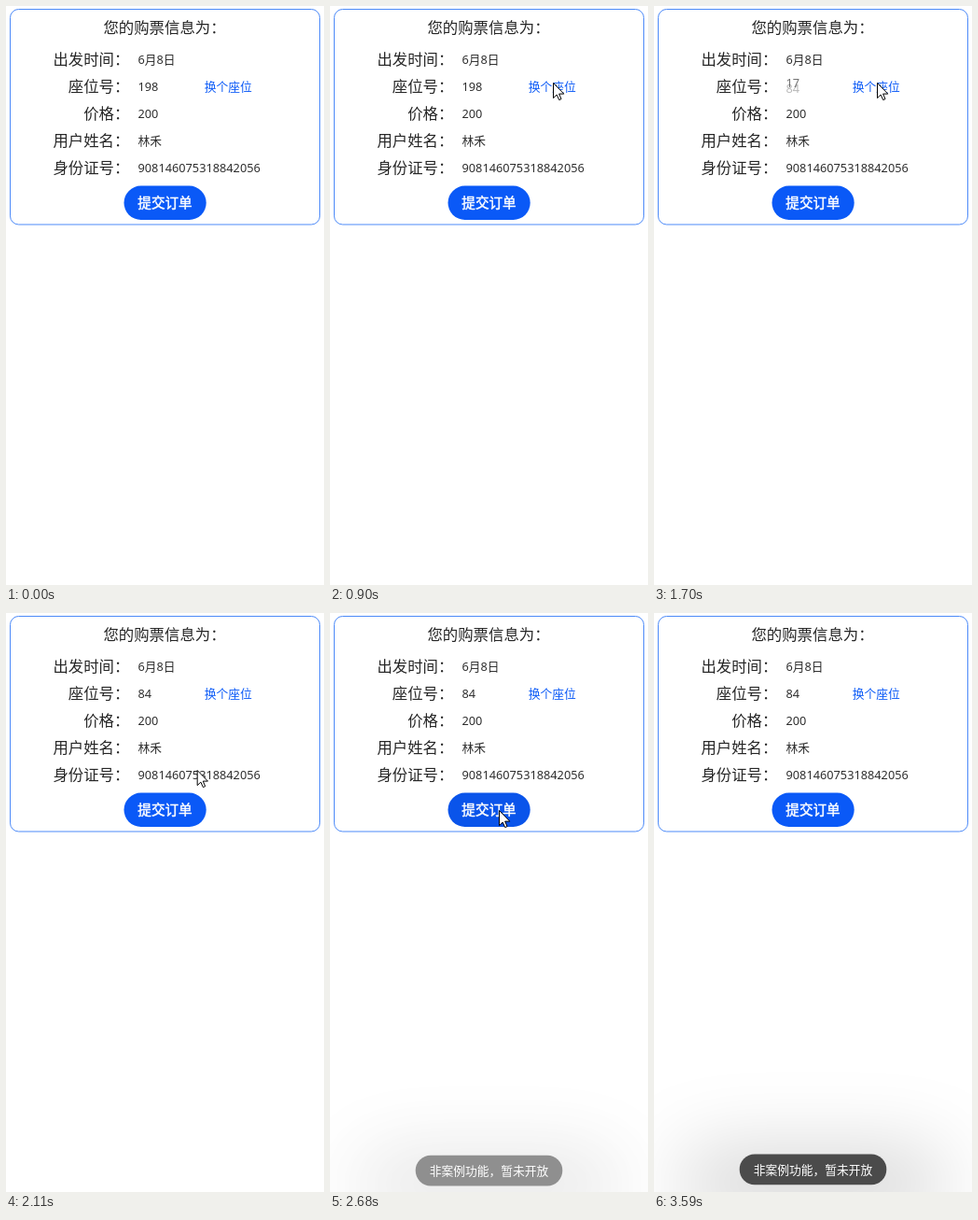
Write an HTML page that moves like this. It is 341x620 px and loops after 4.05 s.

```html
<!DOCTYPE html>
<html lang="zh-CN">
<head>
<meta charset="utf-8">
<title>购票信息</title>
<style>
  html, body { margin: 0; width: 100%; height: 100%; overflow: hidden; background: #fff; }
  svg { display: block; width: 100%; height: 100%; }
  text { font: 12.76px "Noto Sans", "Noto Sans CJK SC", "Noto Sans CJK", sans-serif; fill: #2e2e2e; }
  .label { font-size: 16.4px; fill: #262626; }
  .end { text-anchor: end; }
  .mid { text-anchor: middle; }
  .link { fill: #0a59f7; }
  .action { font-size: 14.6px; fill: #fff; stroke: #fff; stroke-width: .45px; }
  .shadow { filter: blur(42px); fill: rgba(0, 0, 0, .2); }
  .toast-box { fill: #4b4b4b; }
  .toast-text { fill: #fff; }
</style>
</head>
<body>
<svg viewBox="0 0 341 620">
  <rect x="4.5" y="3.5" width="332" height="230.5" rx="9.1" fill="#fff" stroke="#4c8af8"/>
  <text class="label mid" x="170" y="29">您的购票信息为：</text>
  <g id="rows"></g>
  <text id="oldSeat" x="141.5"></text>
  <text id="newSeat" x="141.5"></text>
  <text class="link" x="212.7" y="90.8">换个座位</text>
  <rect id="button" x="126.5" y="192.6" width="88.2" height="36.4" rx="18.2"/>
  <text class="action mid" x="170.5" y="216.1">提交订单</text>
  <g id="toast">
    <rect class="shadow" x="30" y="580" width="281" height="60" rx="30"/>
    <rect class="toast-box" x="91.7" y="579.6" width="157.6" height="32.6" rx="16.3"/>
    <text class="toast-text mid" x="170.5" y="600.6">非案例功能，暂未开放</text>
  </g>
  <path id="cursor" d="M.5 .5V16.6L4.2 13.1 6.7 18.6 9 17.6 6.6 12.1H11.8Z" fill="#fff" stroke="#000"/>
</svg>
<script>
const LOOP = 4050;
const [rows, oldSeat, newSeat, button, toast, cursor] =
  ['rows', 'oldSeat', 'newSeat', 'button', 'toast', 'cursor'].map(id => document.getElementById(id));

const fields = [
  ['出发时间', '6月8日'], ['座位号', ''], ['价格', '200'],
  ['用户姓名', '林禾'], ['身份证号', '908146075318842056'],
];
rows.innerHTML = fields.map(([label, value], i) => {
  const y = 57 + 29 * i;
  return `<text class="label end" x="132.4" y="${y + 6}">${label}：</text>
    <text x="141.5" y="${y + 4.8}">${value}</text>`;
}).join('');

// Pointer legs: start ms, end ms, number of positions, from, to, ease-out power
const legs = [
  [70, 550, 8, [318, 596], [254, 107], 1.5],
  [620, 900, 5, [251, 104], [239, 82], 1.3],
  [1980, 2180, 4, [226, 126], [194, 189], 1],
  [2260, 2400, 3, [188, 200], [181, 211], 1],
  [2820, 2960, 3, [205, 255], [257, 382], 1],
  [3030, 3310, 5, [265, 425], [282, 571], 1.2],
  [3380, 3590, 4, [284, 580], [296, 624], 1],
];
const seatChanges = [[1040, '198', '17'], [1700, '17', '84']];

// Stepped progress from 0 to 1 over a fixed number of positions
function stepped(t, start, end, count) {
  const step = Math.floor((t - start) / (end - start) * (count - 1) + 0.1);
  return Math.min(1, Math.max(0, step / (count - 1)));
}

function drawCursor(t) {
  const leg = legs.filter(([start]) => t >= start).pop();
  cursor.style.display = leg ? '' : 'none';
  if (!leg) return;
  const [start, end, count, from, to, power] = leg;
  const p = 1 - (1 - stepped(t, start, end, count)) ** power;
  const [x, y] = from.map((v, i) => v + (to[i] - v) * p);
  cursor.setAttribute('transform', `translate(${x} ${y})`);
}

function place(node, text, y, opacity) {
  node.textContent = text;
  node.setAttribute('y', y);
  node.setAttribute('opacity', opacity);
}

function drawSeat(t) {
  const [start, before, after] = seatChanges.filter(([s]) => t >= s).pop() || [Infinity, '198', ''];
  const p = t < start ? 0 : stepped(t, start - 70, start + 135, 4);
  place(oldSeat, before, 90.8 - 12 * p, 1 - p);
  place(newSeat, after, 90.8 + 4 * (1 - p), p);
}

function drawSubmit(t) {
  button.setAttribute('fill', t < 2470 || t >= 2750 ? '#0a59f7' : t < 2610 ? '#0950de' : '#0a54ea');
  const shown = t < 2610 ? 0 : t < 2680 ? 0.22 : t < 2750 ? 0.62 : 1;
  toast.setAttribute('opacity', shown);
  toast.setAttribute('transform', `translate(0 ${3.2 * (1 - shown)})`);
}

function draw() {
  const t = performance.now() % LOOP;
  drawCursor(t);
  drawSeat(t);
  drawSubmit(t);
  requestAnimationFrame(draw);
}
draw();
</script>
</body>
</html>
```
